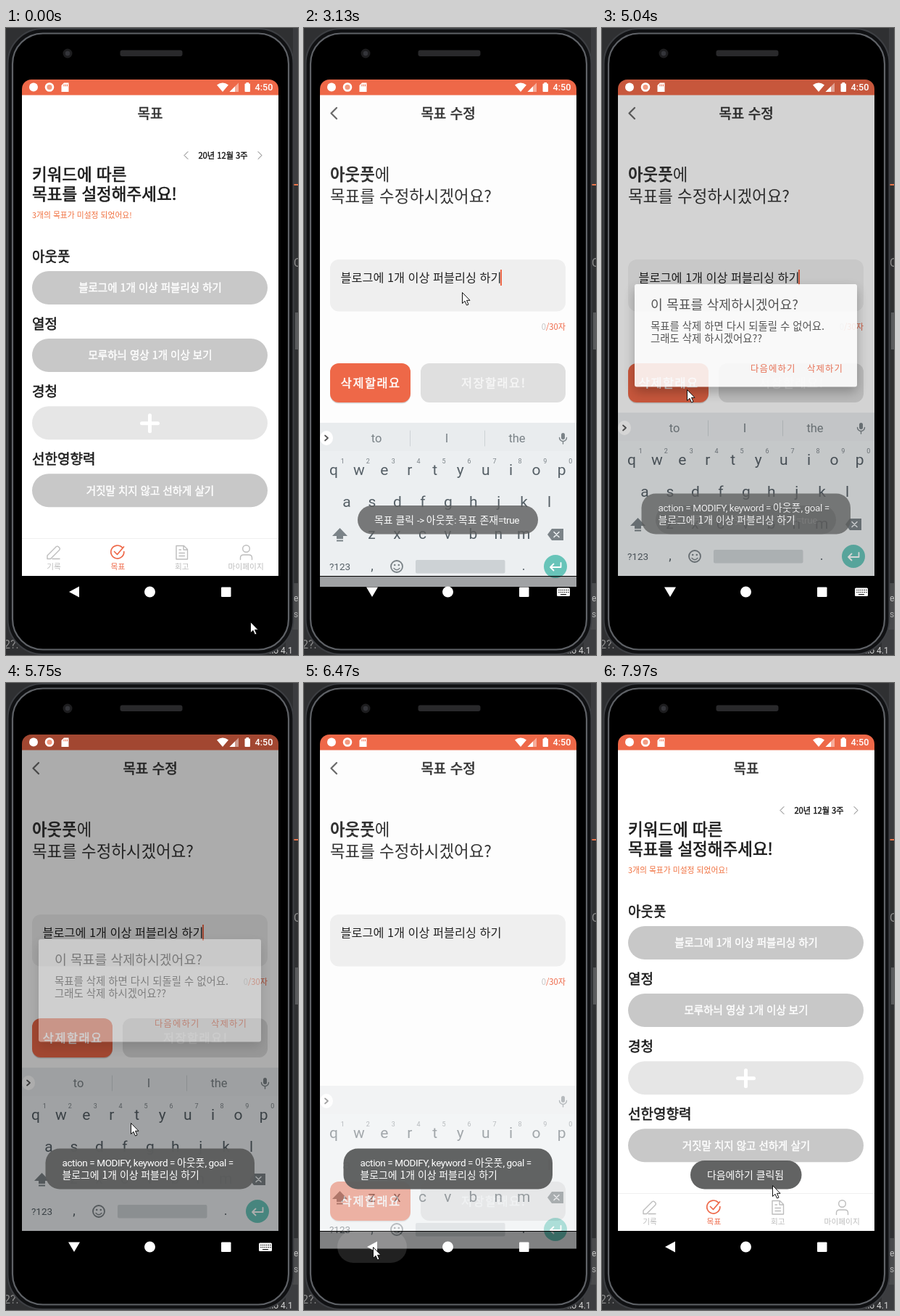
Animation of 403x864 px, one loop 8000 ms. Source, as an HTML page:

```html
<!DOCTYPE html>
<html lang="ko">
<head>
<meta charset="utf-8">
<title>목표</title>
<style>
html, body { margin: 0; width: 100%; height: 100%; overflow: hidden; background: #2f3032; }
svg { display: block; width: 100vw; height: 100vh; font-family: "Noto Sans CJK KR", "Noto Sans KR", sans-serif; }
.key { font-family: Roboto, sans-serif; }
.mid { text-anchor: middle; }
.med { font-weight: 500; }
.narrow { font: 13.5px Roboto, sans-serif; letter-spacing: -.4px; }
.line { fill: none; stroke-linecap: round; stroke-linejoin: round; }
.raised { filter: drop-shadow(0 7px 8px rgba(0, 0, 0, .3)); }
</style>
</head>
<body>
<svg id="stage" viewBox="0 0 403 864"></svg>
<script>
const LOOP = 8000, ACCENT = '#ee6848';
const GOAL = '블로그에 1개 이상 퍼블리싱 하기';

// "strong" text gets a thin outline, halfway between regular and bold.
const text = (x, y, size, fill, str, cls = '', more = '') =>
  `<text x="${x}" y="${y}" font-size="${size}" fill="${fill}" class="${cls}" ${more}
    ${cls.includes('strong') ? `stroke="${fill}" stroke-width="${size * .03}"` : ''}>${str}</text>`;
const rect = (x, y, w, h, r, fill, more = '') =>
  `<rect x="${x}" y="${y}" width="${w}" height="${h}" rx="${r}" fill="${fill}" ${more}/>`;
const line = (d, stroke, width, more = '') =>
  `<path class="line" d="${d}" stroke="${stroke}" stroke-width="${width}" ${more}/>`;
const shape = (d, fill, more = '') => `<path d="${d}" fill="${fill}" ${more}/>`;
const circle = (x, y, r, fill, more = '') => `<circle cx="${x}" cy="${y}" r="${r}" fill="${fill}" ${more}/>`;
const group = (id, body) => `<g id="${id}">${body}</g>`;
const inside = (clip, body) => `<g clip-path="url(#${clip})">${body}</g>`;

function desktop() {
  return rect(0, 0, 403, 864, 0, '#2f3032') +
    rect(396, 0, 7, 215, 0, '#3c3d40') + rect(396, 215, 7, 2, 0, '#e8744a') +
    rect(399, 392, 4, 51, 0, '#5a5b5d') + rect(386, 765, 17, 64, 0, '#4a4b4d') +
    rect(386, 829, 17, 35, 0, '#3c3d40') +
    text(397, 329, 16, '#8a8a8a', 'Q', 'key') +
    text(397, 790, 12, '#c5c5c5', 'e', 'key') + text(397, 812, 12, '#b0b0b0', 's', 'key') +
    text(-3, 855, 16, '#8e8e8e', '2?:', 'key') +
    text(353, 862, 12, '#d5d5d5', 'udio 4.1', 'key');
}

function phone() {
  return rect(2.5, 1, 394, 862, 48, '#101113', 'stroke="#3d3f43" stroke-width="2"') +
    rect(9, 7.5, 381, 849, 42, '#000', 'stroke="#5f6267" stroke-width="2.2"') +
    rect(12, 10.5, 375, 843, 39, '#000') +
    circle(85, 35, 6.5, '#1d1d1f') + circle(85, 35, 3.2, '#34353a') +
    rect(157.5, 30.5, 86, 8.5, 3, '#29292b');
}

function statusIcons() {
  return circle(38, 81.5, 6, '#fff') +
    circle(60, 81.5, 6.3, '#fff') + circle(60, 81.5, 3.6, '#f29a80') +
    shape('M80 75.5h6.5v12.5h-10v-9z', '#fff') + line('M80 78v2M82.3 78v2M84.5 78v2', ACCENT, 1) +
    shape('M291 78.5Q299 72.5 307 78.5L299 88z', '#fff') +
    shape('M321 75.5V88H308.5z', '#fff', 'opacity=".45"') + shape('M316 80.5V88H308.5z', '#fff') +
    rect(329.5, 76.5, 7.5, 11.5, 1, '#fff') + rect(331.5, 75, 3.5, 2, 0, '#fff') +
    text(343.5, 86.3, 12.6, '#fff', '4:50', 'key med');
}

function tabs() {
  const off = '#bdbdbd';
  return rect(22, 703, 354, 1, 0, '#f0f0f0') +
    line('M57 731.5V727L69.5 714.5Q71 713.5 72.5 715L74 716.5Q75 718 73.5 719.5L61.5 731.5ZM64 731.5H74', off, 1.4) +
    line('M160.5 716A9 9 0 1 0 162.8 721.5M149.5 721.5L153.5 725.5L162.5 715', ACCENT, 1.7) +
    line('M237 713.5H245.5L250.5 718.5V732H235V713.5ZM245 713.5V719H250.5M239 719H241.5M239 723.5H246.5M239 727.5H246.5', off, 1.4) +
    circle(331.5, 717.5, 4.8, 'none', `stroke="${off}" stroke-width="1.4"`) +
    line('M323.5 732.5V730Q323.5 726 328 726H335Q339.5 726 339.5 730V732.5', off, 1.4) +
    ['기록', '목표', '회고', '마이페이지'].map((s, i) =>
      text(66 + i * 88.4, 746, 10.7, i == 1 ? ACCENT : off, s, 'mid')).join('');
}

function listScreen() {
  const goals = [['아웃풋', GOAL], ['열정', '모루하늬 영상 1개 이상 보기'], ['경청', ''], ['선한영향력', '거짓말 치지 않고 선하게 살기']];
  const rows = goals.map(([name, goal], i) => {
    const y = 335 + i * 93.1;
    return text(36, y - 13, 19, '#1c1c1c', name, 'strong') +
      rect(36, y, 325, 46, 23, goal ? '#c8c8c8' : '#e6e6e6') +
      (goal ? text(199, y + 28.3, 14.5, '#fff', goal, 'mid strong')
            : line(`M187.5 ${y + 23.5}h22m-11 -11v22`, '#fff', 5));
  }).join('');
  return rect(22, 92, 354, 664, 0, '#fff') +
    text(199, 124.7, 19, '#333', '목표', 'mid strong') +
    line('M251 170.5L246 175.5L251 180.5M348 170.5L353 175.5L348 180.5', '#777', 1) +
    text(299.5, 180.2, 11.2, '#111', '20년 12월 3주', 'mid strong') +
    text(36, 210.3, 22.5, '#1c1c1c', '키워드에 따른', 'strong') +
    text(36, 237.3, 22.5, '#1c1c1c', '목표를 설정해주세요!', 'strong') +
    text(36, 262.2, 10.8, '#f0703f', '3개의 목표가 미설정 되었어요!') +
    rows + tabs();
}

function editScreen() {
  const button = (x, w, fill, ink, label) => rect(x, 462, w, 54, 12, fill) +
    text(x + w / 2 + .7, 495.2, 16.4, ink, label, 'mid strong', 'letter-spacing=".089em"');
  return rect(22, 92, 354, 664, 0, '#fdfdfd') +
    line('M45 110L37.5 117.5L45 125', '#6c6c6c', 2.3) +
    text(199, 124.7, 19, '#333', '목표 수정', 'mid strong') +
    text(36, 209.5, 22.4, '#333', '<tspan font-weight="700">아웃풋</tspan>에') +
    text(36, 240.3, 22.4, '#333', '목표를 수정하시겠어요?') +
    rect(36, 319, 325, 71.5, 12, '#efefef') +
    text(50.5, 350, 16.3, '#222', GOAL) +
    group('caret', rect(271, 333, 2, 22, 0, ACCENT)) +
    text(361, 416.3, 11.2, ACCENT, '<tspan fill="#c4c4c4">0</tspan>/30자', '', 'text-anchor="end"') +
    group('buttons', rect(36, 463.5, 111, 54, 12, '#000', 'opacity=".15"') +
      button(36, 111, ACCENT, '#fff', '삭제할래요') + button(161, 200, '#dfdfdf', '#f6f6f6', '저장할래요!'));
}

function keyboard() {
  const ink = '#566067', soft = '#7b8388', bg = '#eceff1';
  const row = (keys, x, y, size = 21, fill = ink) =>
    [...keys].map((k, i) => text(x + i * 34.95, y, size, fill, k, 'key mid')).join('');
  const words = ['to', 'I', 'the'].map((w, i) => text(100 + i * 97, 557, 16.5, soft, w, 'key mid')).join('') +
    line('M146.5 541V562M249.5 541V562', '#cdd2d5', 1);
  return rect(22, 530, 354, 226, 0, bg) + rect(22, 530, 354, 39, 0, '#e9ecee') +
    rect(22, 541, 18, 20, 10, '#fff') + line('M29 547.5L33 551L29 554.5', '#555', 1.7) +
    group('words', words) +
    rect(355, 544, 5, 9, 2.5, soft) + line('M352.5 550.5A5 5 0 0 0 362.5 550.5M357.5 555.5V559', soft, 1.4) +
    row('1234567890', 53.3, 586, 9, soft) +
    row('qwertyuiop', 41, 602) + row('asdfghjkl', 59, 646) + row('zxcvbnm', 93.5, 690) +
    shape('M49.5 675L60 686H54V690H45V686H39z', soft) + rect(45, 691.5, 9, 2, 0, soft) +
    shape('M342 676H358V692H342L336 684z', soft) + line('M345 680.5L352 687.5M352 680.5L345 687.5', bg, 1.6) +
    text(49.5, 733, 13.5, ink, '?123', 'key mid') + text(94, 733, 18, ink, ',', 'key mid') +
    circle(128, 728, 8, 'none', `stroke="${soft}" stroke-width="1.8"`) +
    circle(125.2, 726, 1.3, soft) + circle(130.8, 726, 1.3, soft) + line('M124 730.5Q128 735 132 730.5', soft, 1.4) +
    rect(154, 719, 123.5, 18.5, 2, '#cdd2d5') + text(303, 733, 18, ink, '.', 'key mid') +
    circle(347, 728, 16, '#68c4b9') + line('M354.5 723V729H340.5M344.5 724.5L340 729L344.5 733.5', '#fff', 1.8);
}

function dialog() {
  const action = (x, s) => text(x, 474, 12.4, ACCENT, s, '', 'letter-spacing=".089em"');
  return rect(45, 353, 307, 141.5, 3, '#fff', 'class="raised"') +
    text(67, 388, 18.3, '#444', '이 목표를 삭제하시겠어요?') +
    text(67, 416.2, 14.4, '#444', '목표를 삭제 하면 다시 되돌릴 수 없어요.') +
    text(67, 432.8, 14.4, '#444', '그래도 삭제 하시겠어요??') +
    action(205, '다음에하기') + action(283, '삭제하기');
}

function navBar() {
  const keys = rect(349, 771.5, 18, 11.5, 1.5, '#fff') +
    line('M352 774.5H365M352 777.5H365', '#000', 1.5, 'stroke-dasharray="0 2.6"') + line('M354.5 780.5H361.5', '#000', 1.2);
  return group('press', rect(46, 755, 96, 44, 22, '#fff', 'opacity=".13"')) +
    group('back', shape('M87 777L101 769.5V784.5z', '#fff')) +
    group('down', shape('M86 770.5H102L94 784z', '#fff') + keys) +
    circle(198.5, 777, 7.5, '#fff') + rect(297, 770.5, 13.5, 13.5, 1, '#fff');
}

function toast(id, x, w, ...rows) {
  const h = 23 + rows.length * 16.5, y = 697.5 - h;
  const label = s => s.replace(/[A-Za-z=,:-][ -~]*/g, '<tspan class="narrow">$&</tspan>');
  return group(id, rect(x, y, w, h, 19.7, '#5c5d5d', 'opacity=".96"') +
    rows.map((s, i) => text(x + 23, y + 24.5 + i * 16.5, 13.9, '#fff', label(s))).join(''));
}

const stage = document.getElementById('stage');
stage.innerHTML = `<defs>
  <clipPath id="glass"><path d="M22 755V84A13 13 0 0 1 35 71H363A13 13 0 0 1 376 84V755z"/></clipPath>
  <clipPath id="lower"><path d="M22 500H376V779.5H22z"/></clipPath></defs>` +
  desktop() + phone() +
  inside('glass', listScreen() + group('edit', editScreen()) + rect(22, 71, 354, 21.5, 0, ACCENT)) +
  inside('lower', group('keys', keyboard()) + group('strip', rect(22, 755, 354, 25, 0, '#000', 'opacity=".32"'))) +
  inside('glass', group('dim', rect(22, 71, 354, 685, 0, '#000'))) +
  rect(22, 755, 354, 1, 0, '#000') +
  statusIcons() + group('dialog', dialog()) + navBar() +
  toast('toast1', 74, 249, '목표 클릭 -> 아웃풋: 목표 존재=true') +
  toast('toast2', 54.5, 288.5, 'action = MODIFY, keyword = 아웃풋, goal =', GOAL) +
  toast('toast3', 122, 153.5, '다음에하기 클릭됨') +
  group('cursor', shape('M.5 .5V15.5L4 12.3L6.5 18L9 17L6.5 11.3H11z', '#fff', 'stroke="#111"'));

const el = {};
stage.querySelectorAll('g[id]').forEach(g => el[g.id] = g);

const ramp = (t, from, len) => Math.min(1, Math.max(0, (t - from) / len));
const pulse = (t, from, to, len = 200) => ramp(t, from, len) - ramp(t, to, len);
const between = (t, a, b) => t >= a && t < b;

// Pointer moves: departure, travel time, destination.
const moves = [
  [0, 145, 232, 653], [220, 220, 262, 818], [440, 490, 175, 207], [930, 320, 220, 410], [1250, 160, 215, 366],
  [2260, 80, 215, 370], [2340, 160, 207, 354], [2500, 160, 218, 364], [3370, 560, 150, 770], [3930, 800, 117, 498],
  [5040, 160, 189, 520], [5200, 240, 206, 477], [5600, 312, 138, 736], [5912, 400, 95, 777], [7500, 465, 235, 692]
];
function pointer(t) {
  let x = 337, y = 818;
  for (const [from, len, toX, toY] of moves) {
    const p = ramp(t, from, len);
    x += (toX - x) * p;
    y += (toY - y) * p;
  }
  return [x, y];
}

const ticks = [0, 290, 1650, 2340, 2890, 5040, 6470, 7500, 7970, LOOP];
function snap(t) {
  const i = ticks.findIndex(k => k > t) - 1, a = ticks[i], span = ticks[i + 1] - a;
  const step = span / Math.max(1, Math.round(span / 79));
  return a + Math.floor((t - a) / step + .1) * step;
}

const show = (g, on) => g.setAttribute('visibility', on ? 'inherit' : 'hidden');
const fade = (g, v) => { g.setAttribute('opacity', v); show(g, v > 0); };
const move = (g, x, y) => g.setAttribute('transform', `translate(${Math.round(x)} ${Math.round(y)})`);

function render(now) {
  const t = snap(now % LOOP);
  move(el.cursor, ...pointer(t));

  const opened = pulse(t, 2870, 7520);
  fade(el.edit, opened);
  move(el.edit, 0, 30 * (1 - opened));

  const rise = ramp(t, 2970, 320), leave = ramp(t, 6310, 350);
  fade(el.keys, rise > 0 ? 1 - leave : 0);
  move(el.keys, 0, 220 * (1 - rise) ** 4 + 120 * leave ** 2);
  show(el.strip, between(rise, .2, 1));

  const typing = between(t, 3030, 6390);
  show(el.words, typing);
  show(el.down, typing);
  show(el.back, !typing);
  move(el.buttons, 0, typing ? 0 : 225);
  show(el.caret, opened > 0 && (between(t, 4900, 5900) || (t + 100) % 1000 < 500));

  fade(el.dim, .32 * pulse(t, 4870, 5810, 330));
  fade(el.dialog, pulse(t, 4866, 5640));
  fade(el.toast1, pulse(t, 2960, 4930));
  fade(el.toast2, pulse(t, 4880, 6880));
  fade(el.toast3, ramp(t, 7120, 200));
  fade(el.press, pulse(t, 6230, 6500) + pulse(t, 7400, 7600));
}

const start = performance.now();
function loop() {
  render(performance.now() - start);
  requestAnimationFrame(loop);
}
loop();
</script>
</body>
</html>
```
